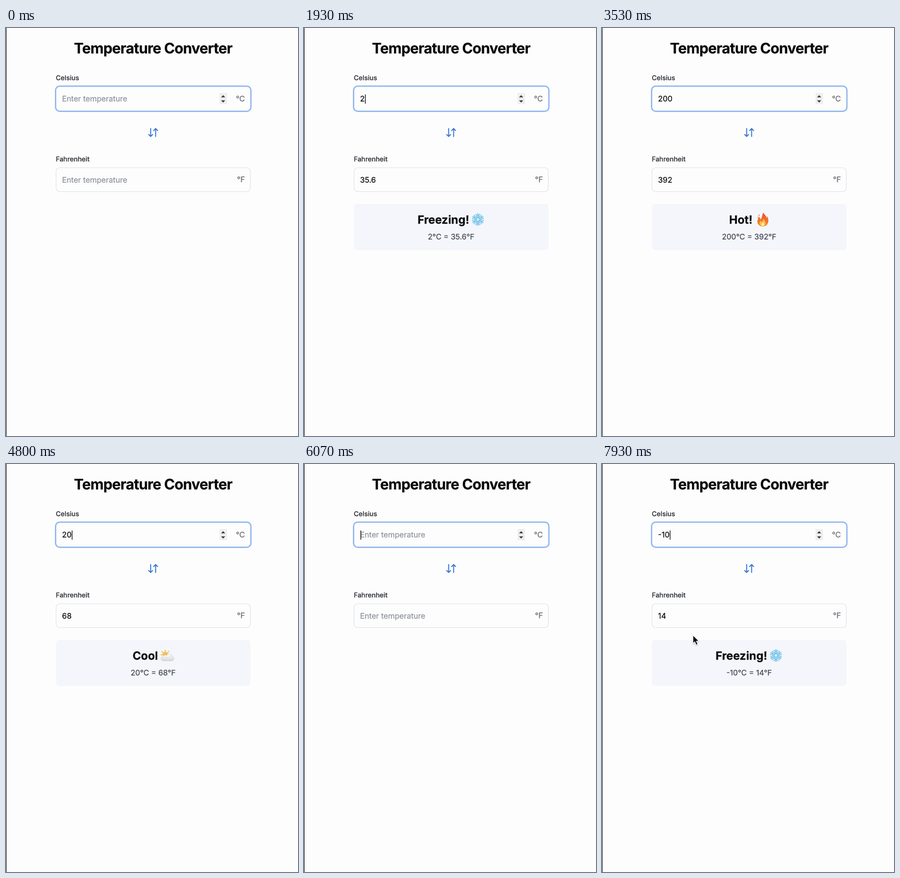
Write an HTML page that moves like this. It is 633x884 px and loops after 8000 ms.

```html
<!DOCTYPE html>
<html lang="en">
<head>
<meta charset="utf-8">
<title>Temperature Converter</title>
<style>
  html, body { margin: 0; width: 100%; height: 100%; overflow: hidden; background: #fdfdfd; }
  svg { display: block; width: 633px; height: 884px; }
  text {
    font: 400 16.6px Inter, sans-serif; white-space: pre; text-rendering: geometricPrecision;
    color: #08090c; fill: currentColor; stroke: currentColor; stroke-width: .25px;
  }
  .title { font-size: 31.5px; font-weight: 700; letter-spacing: -0.025em; text-anchor: middle; }
  .label { font-size: 14.4px; font-weight: 500; color: #30343b; }
  .unit { color: #686d76; text-anchor: end; }
  .empty { color: #8e939d; }
  .mood { font-size: 24.6px; font-weight: 700; }
  .sum { font-size: 16.5px; color: #41464f; text-anchor: middle; }
</style>
</head>
<body>
<svg viewBox="0 0 633 884">
  <defs>
    <linearGradient id="flameFill" x1="0" y1="0" x2="0" y2="1">
      <stop offset="0" stop-color="#e8532b"/>
      <stop offset="1" stop-color="#f58a2c"/>
    </linearGradient>
    <linearGradient id="cloudFill" x1="0" y1="0" x2="0" y2="1">
      <stop offset="0" stop-color="#fbfbfa"/>
      <stop offset="1" stop-color="#d5d8da"/>
    </linearGradient>
    <path id="arm" d="M0-3.2V-12.5M-4-11 0-7.5 4-11M-3.5-6.5 0-3.2 3.5-6.5" fill="none" stroke-linecap="round" stroke-linejoin="round"/>
    <path id="beamShape" d="M-4.2-9.7Q-.7-9.7 0-7.5 .7-9.7 4.2-9.7M0-7.5V8M-4.2 10.2Q-.7 10.2 0 8 .7 10.2 4.2 10.2M-2.3 4.2H2.3"/>
  </defs>

  <rect width="633" height="884" fill="#fdfdfd"/>
  <rect width="1.2" height="884" fill="#26272a"/>
  <text class="title" x="319" y="55.2">Temperature Converter</text>

  <text class="label" x="108" y="113.3">Celsius</text>
  <rect x="107.5" y="125.9" width="423.4" height="54.5" rx="9" fill="#fdfdfd" stroke="#95b9ef" stroke-width="3"/>
  <text id="celsius" x="121.6" y="159.3"></text>
  <rect id="caret" y="144" width="1.5" height="20" fill="#111"/>
  <rect x="463" y="141" width="16" height="24" fill="#eeeeee"/>
  <path d="M466.2 150.2 470.7 145.4 475.2 150.2ZM466.2 156.8 470.7 161.6 475.2 156.8Z" fill="#3b3b3c"/>
  <text class="unit" x="518" y="158.5">°C</text>

  <path transform="translate(306 213.5) scale(1.08)" d="M3 16l4 4 4-4M7 20V4M21 8l-4-4-4 4M17 4v16"
    fill="none" stroke="#3c78d4" stroke-width="2" stroke-linecap="round" stroke-linejoin="round"/>

  <text class="label" x="108" y="289">Fahrenheit</text>
  <rect x="108.5" y="302.7" width="421.2" height="51.8" rx="8" fill="#fdfdfd" stroke="#dcdee1" stroke-width="1.1"/>
  <text id="fahrenheit" x="121.6" y="335"></text>
  <text class="unit" x="518" y="334">°F</text>

  <g id="panel">
    <rect x="108" y="381" width="422" height="100" rx="8" fill="#f4f6fb"/>
    <text id="mood" class="mood" y="423.6"></text>
    <text id="sum" class="sum" x="319" y="458"></text>
    <g id="cool" transform="translate(350 416)">
      <path d="M-12.5-9.5-9-7M-5-12.5-4.5-9M3-10.5 1-8M-14-2.5-10-3" stroke="#f6b94a" stroke-width="2" stroke-linecap="round"/>
      <circle cx="-4.5" cy="-3" r="6" fill="#f8bd48"/>
      <path d="M-9 10.5a5 5 0 0 1-.8-9.9A6 6 0 0 1-2-1.5 7 7 0 0 1 10.7 1.4 4.7 4.7 0 0 1 9.5 10.5Z"
        fill="url(#cloudFill)" stroke="#c5c9cc" stroke-width=".8"/>
    </g>
    <g id="hot" transform="translate(348.6 415)">
      <path d="M1-15C4-10 8-8 8-3 9-4 9.3-6 9-8 12-3 13 3 11 8 8 14 3 15 0 15-7 15-12 10-11.8 4-11.6 0-9-2-8.5-6-6-4-5.5-2-5 0-1-4-2-10 1-15Z" fill="url(#flameFill)"/>
      <path d="M1-3C2 1 6 3 6 8 6 12 3 14.5 0 14.5S-7 12 -7 7C-7 5-6 3-5 2-4 4-3 5-2 5 0 3 1 0 1-3Z" fill="#fcc04b"/>
      <path d="M0 6C3 8 4 14 0 14S-4 10 0 6Z" fill="#fff0a6"/>
      <path d="M-8.5-10.5-7.7-8M-10.8-5-10.4-3.5" stroke="#ee7043" stroke-width="1.6" stroke-linecap="round"/>
    </g>
    <g id="freezing" transform="translate(377 415)"></g>
  </g>

  <g id="arrow" style="filter:drop-shadow(0 1px 1px #0005)">
    <path d="M0 0V17.8L4 14.1 6.9 21 10.2 19.6 7.3 12.8H12.8Z" fill="#000" stroke="#fff" stroke-width="1.2"/>
  </g>
  <g id="beam" fill="none" stroke-linecap="round">
    <use href="#beamShape" stroke="#fff" stroke-width="3.2"/>
    <use href="#beamShape" stroke="#111" stroke-width="1.5"/>
  </g>
</svg>
<script>
const LOOP = 8000;
const $ = id => document.getElementById(id);

const arms = (color, width) => [0, 60, 120, 180, 240, 300].map(a =>
  `<use href="#arm" transform="rotate(${a})" stroke="${color}" stroke-width="${width}"/>`).join('');
$('freezing').innerHTML = arms('#b2def3', 3.4) + arms('#74c1e6', 1.1);

// [time, typed text]; each edit restarts the caret blink
const edits = [
  [-800, ''], [1650, '2'], [2000, '20'], [2750, '200'], [4400, '20'],
  [5430, '2'], [5640, ''], [6480, '-'], [6680, '-1'], [6850, '-10']
];

// heading and its left edge
const moods = {
  freezing: ['Freezing!', 246.2],
  cool: ['Cool', 274.4],
  hot: ['Hot!', 275.6]
};
const moodOf = c => c < 10 ? 'freezing' : c <= 25 ? 'cool' : 'hot';

// start, end, hide time, from, to
const moves = [
  [400, 870, 1650, [553, 343], [320, 132.5]],
  [7400, 7900, LOOP, [320, 132.5], [197.3, 371]]
];

const show = (id, on) => $(id).setAttribute('visibility', on ? 'inherit' : 'hidden');

function setField(id, value) {
  const field = $(id);
  field.textContent = value || 'Enter temperature';
  field.setAttribute('class', value ? '' : 'empty');
}

function drawValues(typed) {
  const known = typed !== '' && typed !== '-';
  const c = Number(typed);
  const f = known ? String(Math.round(c * 18 + 320) / 10) : '';
  setField('celsius', typed);
  setField('fahrenheit', f);
  $('caret').setAttribute('x', typed ? 122 + $('celsius').getComputedTextLength() : 122.5);
  $('panel').setAttribute('visibility', known ? 'visible' : 'hidden');
  for (const id in moods) show(id, known && id === moodOf(c));
  if (!known) return;
  const [name, x] = moods[moodOf(c)];
  $('mood').textContent = name;
  $('mood').setAttribute('x', x);
  $('sum').textContent = `${typed}°C = ${f}°F`;
}

function drawPointer(t) {
  const move = moves.find(([start, , hide]) => t >= start && t < hide);
  let overInput = false;
  if (move) {
    const [start, end, , from, to] = move;
    const p = Math.min(1, (t - start) / (end - start));
    const e = p * p * (3 - 2 * p);
    const [x, y] = from.map((v, i) => v + (to[i] - v) * e);
    overInput = x > 108 && x < 530 && (y > 126 && y < 180 || y > 303 && y < 355);
    for (const id of ['arrow', 'beam']) $(id).setAttribute('transform', `translate(${x} ${y})`);
  }
  show('arrow', move && !overInput);
  show('beam', move && overInput);
}

let shown = null;
function frame() {
  const t = performance.now() % LOOP;
  const [since, typed] = edits.filter(e => e[0] <= t).pop();
  if (typed !== shown) drawValues(shown = typed);
  show('caret', (t - since) % 1000 < 500);
  drawPointer(t);
  requestAnimationFrame(frame);
}
frame();
</script>
</body>
</html>
```
